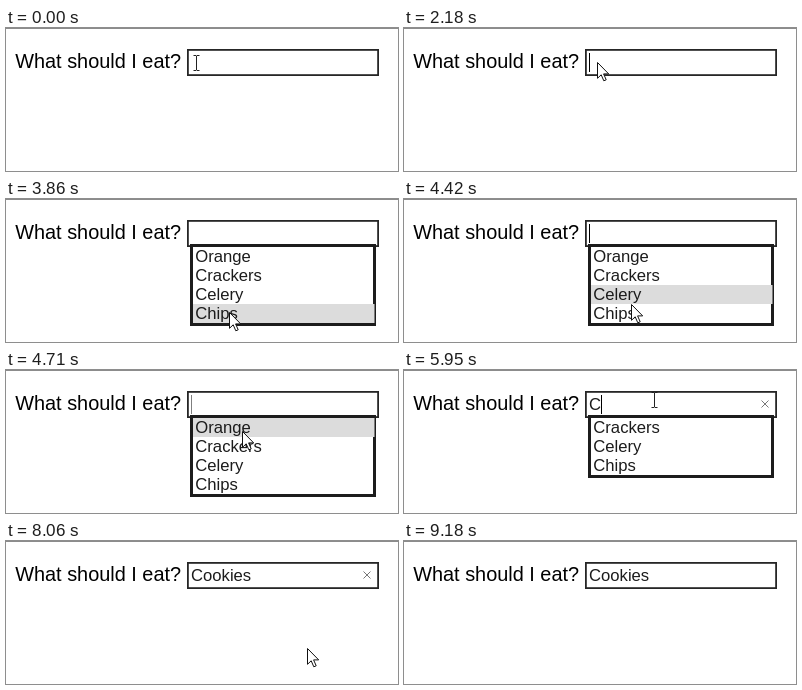
These frames come from a looping animation (392 by 143 pixels, 9280 ms). An HTML page:

```html
<!DOCTYPE html>
<html lang="en">
<head>
<meta charset="utf-8">
<title>What should I eat?</title>
<style>
  html, body { margin: 0; width: 100%; height: 100%; overflow: hidden; background: #fff; }
  svg { display: block; width: 392px; height: 143px; }
  text { font-family: "Liberation Sans", Arial, sans-serif; font-size: 16.67px; fill: #1c1c1c; white-space: pre; }
  .label { font-size: 19.9px; fill: #000; }
</style>
</head>
<body>
<svg viewBox="0 0 392 143">
  <rect width="392" height="143" fill="#fff"/>
  <rect width="392" height="1" fill="#8c8c8c"/>
  <text class="label" x="9.2" y="40">What should I eat?</text>
  <rect x="181.9" y="21.9" width="190.2" height="25.2" fill="#fff" stroke="#262626" stroke-width="1.8"/>
  <text id="typed" x="185" y="40"></text>
  <rect id="caret" y="25" width="1" height="19" fill="#000"/>
  <path id="clear" d="M357.5 30.5l7 7m0-7l-7 7" stroke="#777" fill="none"/>
  <g id="list">
    <rect id="frame" x="184" y="45" width="186" fill="#1c1c1c"/>
    <rect id="paper" x="187" y="48" width="180" fill="#fff"/>
    <rect id="hover" x="187" width="181.5" height="19" fill="#dcdcdc"/>
    <g id="items"></g>
  </g>
  <path id="arrow" d="M.5 .5v15.8l3.7-3.5 2.6 6 2.4-1-2.6-5.9h5.1z" fill="#fff" stroke="#111"/>
  <path id="beam" d="M-3 -7.5h2.5l.5.5.5-.5h2.5M0 -7v14M-3 7.5h2.5l.5-.5.5.5h2.5" fill="none" stroke="#222"/>
</svg>
<script>
const LOOP = 9280, STEP = 142, ROW = 19, LIST_TOP = 48;
const CLICK = 2180, OPEN = 2310, TYPE = 5820, CLOSE = 6380, BLUR = 9180;
const foods = ["Orange", "Crackers", "Celery", "Chips"];
const word = "Cookies";
const el = id => document.getElementById(id);
const [typed, caret, clear, list, frame, paper, hover, items, arrow, beam] =
  ["typed", "caret", "clear", "list", "frame", "paper", "hover", "items", "arrow", "beam"].map(el);

// Two slow letters, then a steady run
const keyTimes = [...word].map((_, i) =>
  i < 2 ? TYPE + i * (CLOSE - TYPE) : 6660 + (i - 2) * STEP);

const home = { x: 190.5, y: 35 };
const legs = [
  { at: 550, steps: 4, x: 211, y: 36 },
  { at: 1110, steps: 3, x: 194, y: 35 },
  { at: 1620, steps: 2, x: 193, y: 34 },
  { at: 3140, steps: 3, x: 203.5, y: 46 },
  { at: 3570, steps: 3, x: 223, y: 113 },
  { at: 3996, steps: 2, x: 224, y: 119 },
  { at: 4283, steps: 4, x: 236, y: 61 },
  { at: 4850, steps: 3, x: 250.5, y: 29.5 },
  { at: 7630, steps: 7, x: 340, y: 165 }
];

const show = (node, on) => node.setAttribute("visibility", on ? "inherit" : "hidden");

function pointer(t) {
  let { x, y } = home;
  for (const leg of legs) {
    if (t < leg.at) break;
    const k = Math.min(1, (Math.floor((t - leg.at) / STEP) + 1) / leg.steps);
    x += (leg.x - x) * k;
    y += (leg.y - y) * k;
  }
  return [x, y];
}

// Blinks through a half-faded level; a click or key restarts it
function caretLevel(t) {
  if (t < CLICK) return 0;
  const reset = [CLICK, ...keyTimes].filter(k => k <= t).pop();
  const age = Math.max(0, t - reset - 230);
  return Math.round(1 + Math.cos(age / 1060 * 2 * Math.PI)) / 2;
}

function fillList(names) {
  const height = names.length * ROW;
  frame.setAttribute("height", height + 6);
  paper.setAttribute("height", height);
  items.innerHTML = names.map((name, i) =>
    `<text x="189.3" y="${63 + i * ROW}">${name}</text>`).join("");
}

let shownCount = 0;

function draw(t) {
  const [x, y] = pointer(t);
  const text = word.slice(0, keyTimes.filter(k => k <= t).length);
  const open = t >= OPEN && t < CLOSE;
  const isArrow = y > LIST_TOP || (t >= CLICK && t < 4283);

  typed.textContent = text;
  caret.setAttribute("x", 185 + Math.round(text ? typed.getComputedTextLength() : 0));
  caret.setAttribute("opacity", caretLevel(t));
  show(clear, t >= TYPE && t < BLUR);

  const names = t < TYPE + STEP - 12 ? foods : foods.filter(f => f.startsWith(word[0]));
  if (names.length !== shownCount) fillList(names);
  shownCount = names.length;
  show(list, open);

  const row = Math.min(names.length - 1, Math.floor((y - LIST_TOP) / ROW));
  show(hover, open && isArrow && row >= 0);
  hover.setAttribute("y", LIST_TOP + Math.max(0, row) * ROW);

  show(arrow, isArrow);
  show(beam, !isArrow);
  arrow.setAttribute("transform", `translate(${Math.floor(x)} ${Math.round(y)})`);
  beam.setAttribute("transform", `translate(${Math.floor(x) + .5} ${Math.round(y)})`);
}

const begin = performance.now();
function tick() {
  draw((performance.now() - begin) % LOOP);
  requestAnimationFrame(tick);
}
tick();
</script>
</body>
</html>
```
